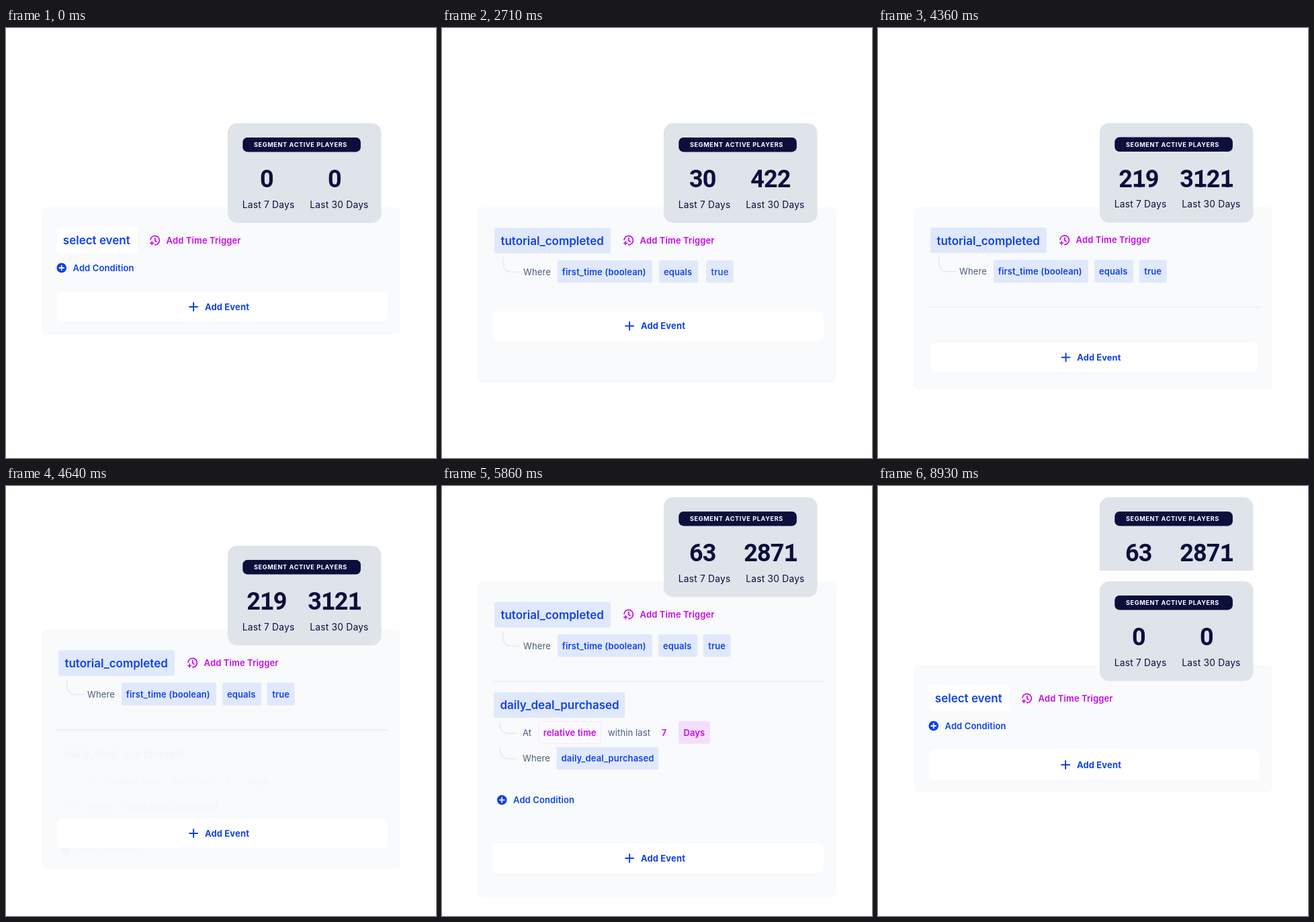
An HTML page with a canvas for the animation above (9000 ms loop, 640x640 px).

```html
<!DOCTYPE html>
<html lang="en">
<head>
<meta charset="utf-8">
<title>Segment builder</title>
<style>
html, body { margin: 0; width: 100%; height: 100%; overflow: hidden; background: #fff; }
canvas { display: block; width: 100vw; height: 100vh; }
</style>
</head>
<body>
<canvas id="stage"></canvas>
<script>
const LOOP = 9000, SIZE = 640;
const BLUE = '#1142e4', PINK = '#c808e6', NAVY = '#0c0f3c', SLATE = '#4a5c7d';
const TAG = '#e0e8fb', PANEL = '#f8fafc', LINE = '#dfe5f4';
const SMALL = 13, LARGE = 17;
const canvas = document.getElementById('stage');
const ctx = canvas.getContext('2d');
const ratio = window.devicePixelRatio || 1;
canvas.width = canvas.height = SIZE * ratio;
const copy = document.createElement('canvas');
copy.width = copy.height = canvas.width;
const copyCtx = copy.getContext('2d');

const clamp = v => Math.min(1, Math.max(0, v));
const span = (t, a, b) => clamp((t - a) / (b - a));
const mix = (a, b, p) => a + (b - a) * p;
const outCubic = u => 1 - (1 - u) ** 3;
const inOutQuad = u => u < .5 ? 2 * u * u : 1 - 2 * (1 - u) ** 2;
const inOutCubic = u => u < .5 ? 4 * u ** 3 : 1 - 4 * (1 - u) ** 3;
const blend = (a, b, p) => `rgb(${a.map((v, i) => Math.round(mix(v, b[i], p)))})`;

function box(x, y, w, h, r, fill, edge) {
  ctx.beginPath();
  ctx.roundRect(x, y, w, h, r);
  ctx.fillStyle = fill;
  ctx.fill();
  if (edge) {
    ctx.strokeStyle = edge;
    ctx.lineWidth = 1;
    ctx.stroke();
  }
}

// y is the middle of the capital letters
function text(s, x, y, size, weight, color, spacing = size < 14 ? .12 : 0) {
  ctx.font = `${weight} ${size}px Inter, sans-serif`;
  ctx.letterSpacing = spacing + 'px';
  ctx.textAlign = 'left';
  ctx.fillStyle = color;
  ctx.fillText(s, x, y + size * .364);
  ctx.letterSpacing = '0px';
}

function layer(alpha, draw, dx = 0, dy = 0) {
  if (alpha <= 0) return;
  ctx.save();
  ctx.globalAlpha *= alpha;
  ctx.translate(dx, dy);
  draw();
  ctx.restore();
}

function stroke(color, width, path) {
  ctx.strokeStyle = color;
  ctx.lineWidth = width;
  ctx.lineCap = ctx.lineJoin = 'round';
  ctx.beginPath();
  path();
  ctx.stroke();
}

function plus(x, y, arm, width, color) {
  stroke(color, width, () => {
    ctx.moveTo(x - arm, y); ctx.lineTo(x + arm, y);
    ctx.moveTo(x, y - arm); ctx.lineTo(x, y + arm);
  });
}

function elbow(x, y, depth) {
  stroke(LINE, 1.2, () => {
    ctx.moveTo(x, y);
    ctx.arcTo(x, y + depth, x + 25, y + depth, 12);
    ctx.lineTo(x + 25, y + depth);
  });
}

function tag(s, x, y, w, h, tx, size, color = BLUE, fill = TAG) {
  box(x, y, w, h, 3, fill);
  text(s, tx, y + h / 2 + .3, size, 600, color);
}

function timeTrigger(dx) {
  layer(1, () => {
    stroke(PINK, 1.7, () => {
      ctx.arc(221.7, 316, 6.7, Math.PI * .5, -Math.PI * .96, true);
      ctx.moveTo(221.9, 312.6);
      ctx.lineTo(221.9, 316.6);
      ctx.lineTo(224, 318);
    });
    plus(217.2, 320.4, 2.4, 1.6, PINK);
    text('Add Time Trigger', 238.6, 316, SMALL, 600, PINK);
  }, dx);
}

function addCondition(x, y) {
  ctx.fillStyle = BLUE;
  ctx.beginPath();
  ctx.arc(x, y, 7.3, 0, Math.PI * 2);
  ctx.fill();
  plus(x, y, 3.3, 1.8, '#fff');
  text('Add Condition', x + 16.8, y, SMALL, 600, BLUE);
}

function addEvent(y, scale) {
  layer(1, () => {
    ctx.scale(scale, scale);
    box(-246.2, -22, 492.4, 44, 8, '#fff');
    plus(-42.7, 0, 6, 2, BLUE);
    text('Add Event', -25.8, 0, SMALL, 700, BLUE);
  }, 321.8, y);
}

// Even-width figures whose 1 stands on a foot
function bigNumber(n, cx) {
  const s = String(Math.round(n)), base = 237;
  ctx.font = '700 36px Roboto, sans-serif';
  ctx.textAlign = 'center';
  ctx.fillStyle = NAVY;
  [...s].forEach((c, i) => {
    const x = cx + (i - (s.length - 1) / 2) * 19.8;
    ctx.fillText(c, x, base);
    if (c === '1') ctx.fillRect(x - 7.5, base - 4.5, 16.5, 4.5);
  });
}

function card(week, month) {
  box(330, 141.8, 228.5, 148.4, 14, '#dfe3ea');
  box(352.3, 163, 175.6, 21.4, 7, NAVY);
  text('SEGMENT ACTIVE PLAYERS', 369, 174, 9.2, 700, '#fff', .58);
  bigNumber(week, 388.3);
  bigNumber(month, 489.3);
  text('Last 7 Days', 351.8, 262.6, 13.8, 400, NAVY, .2);
  text('Last 30 Days', 452.3, 262.6, 13.8, 400, NAVY, .2);
}

// Closed field, open list, then the chosen event as a tag
function picker(t) {
  const open = outCubic(span(t, 750, 1210));
  const pick = inOutCubic(span(t, 1640, 2060));
  const x = mix(75.3, 78, pick);
  const y = mix(mix(296.5, 274, open), 297.5, pick);
  const w = mix(mix(120.7, 195.2, open), 173, pick);
  const h = mix(mix(38.5, 114, open), 38, pick);
  box(x, y, w, h, mix(5, 3, pick), blend([255, 255, 255], [224, 232, 251], pick));
  layer(1 - span(t, 460, 640), () => text('select event', 84.8, 316, LARGE, 600, BLUE));
  layer(open, () => {
    const cy = mix(mix(316, 331, open), 317, pick), gap = 35.3 * open;
    layer(1 - span(t, 1640, 1860), () => {
      text('{event list item}', 85.5, cy - gap, 12.3, 400, NAVY);
      text('{event list item}', 85.5, cy + gap, 12.3, 400, NAVY);
    });
    text('tutorial_completed', mix(85.5, 87.4, pick), cy, mix(12.3, LARGE, pick),
      pick > .5 ? 600 : 400, blend([12, 15, 60], [17, 66, 228], pick));
  });
}

function firstFilter(t) {
  layer(span(t, 2300, 2650), () => {
    elbow(90.8, 341.5, 21.5);
    text('Where', 121, 362.8, SMALL, 400, SLATE);
  });
  const parts = [
    ['first_time (boolean)', 172, 141, 178.8],
    ['equals', 322, 58.3, 329],
    ['true', 388.6, 41, 396.2]
  ];
  parts.forEach(([s, x, w, tx], i) => {
    const start = 2250 + i * 100, p = outCubic(span(t, start, start + 500));
    layer(p, () => tag(s, x, 345.7, w, 33.6, tx, SMALL), 40 * (1 - p));
  });
}

function secondFilter() {
  tag('daily_deal_purchased', 77, 432, 195, 38, 86.4, LARGE);
  elbow(86.4, 476, 17.3);
  text('At', 120, 492, SMALL, 400, SLATE);
  box(144.5, 475.5, 92, 33, 3, '#fbf9fe', '#f5e9fc');
  text('relative time', 150.8, 492, SMALL, 600, PINK);
  text('within last', 247, 492, SMALL, 400, SLATE);
  text('7', 326.7, 492, SMALL, 600, PINK);
  tag('Days', 352, 474.8, 47, 34, 359.4, SMALL, PINK, '#f3dffb');
  elbow(86.4, 514, 17);
  text('Where', 120, 530.4, SMALL, 400, SLATE);
  tag('daily_deal_purchased', 170.5, 513.5, 151.7, 33.5, 177.6, SMALL);
  addCondition(89.2, 592.3);
}

function scene(t) {
  const scroll = inOutCubic(span(t, 4290, 5030));
  const drop = inOutCubic(span(t, 2450, 3020));
  const grow = outCubic(span(t, 2450, 2963));
  const up = inOutQuad(span(t, 2422, 3530));
  const down = inOutQuad(span(t, 4770, 5880));
  const press = span(t, 4030, 4140) * (1 - span(t, 4290, 4560));
  ctx.fillStyle = '#fff';
  ctx.fillRect(0, 0, SIZE, SIZE);
  layer(1, () => {
    box(53, 266.7, 534, 189.3 + 82 * grow + 200 * scroll, 8, PANEL);
    layer(span(t, 2750, 3100), () => {
      ctx.fillStyle = '#e8ecf2';
      ctx.fillRect(75.5, 415.3, 491.5, 1.4);
    });
    if (t < 1400) addCondition(82.7, 357);
    timeTrigger(56 * inOutCubic(span(t, 1640, 2060)));
    picker(t);
    firstFilter(t);
    layer(inOutCubic(span(t, 4540, 5100)), secondFilter);
    addEvent(415 + 75 * drop + 189 * scroll, 1 - .016 * press);
    card(mix(219 * up, 63, down), mix(3121 * up, 2871, down));
  }, 0, -125 * scroll);
}

function render(t) {
  ctx.setTransform(ratio, 0, 0, ratio, 0, 0);
  scene(t);
  const back = inOutCubic(span(t, 8570, 8950));
  if (!back) return;
  // Dissolve to the opening view; the strip above it stays until the loop ends
  const strip = 125.5;
  copyCtx.drawImage(canvas, 0, 0);
  scene(0);
  layer(1 - back, () => ctx.drawImage(copy, 0, 0, SIZE, SIZE));
  ctx.drawImage(copy, 0, 0, copy.width, strip * ratio, 0, 0, SIZE, strip);
}

let begin;
function tick(now) {
  begin ??= now;
  render((now - begin) % LOOP);
  requestAnimationFrame(tick);
}
requestAnimationFrame(tick);
</script>
</body>
</html>
```
